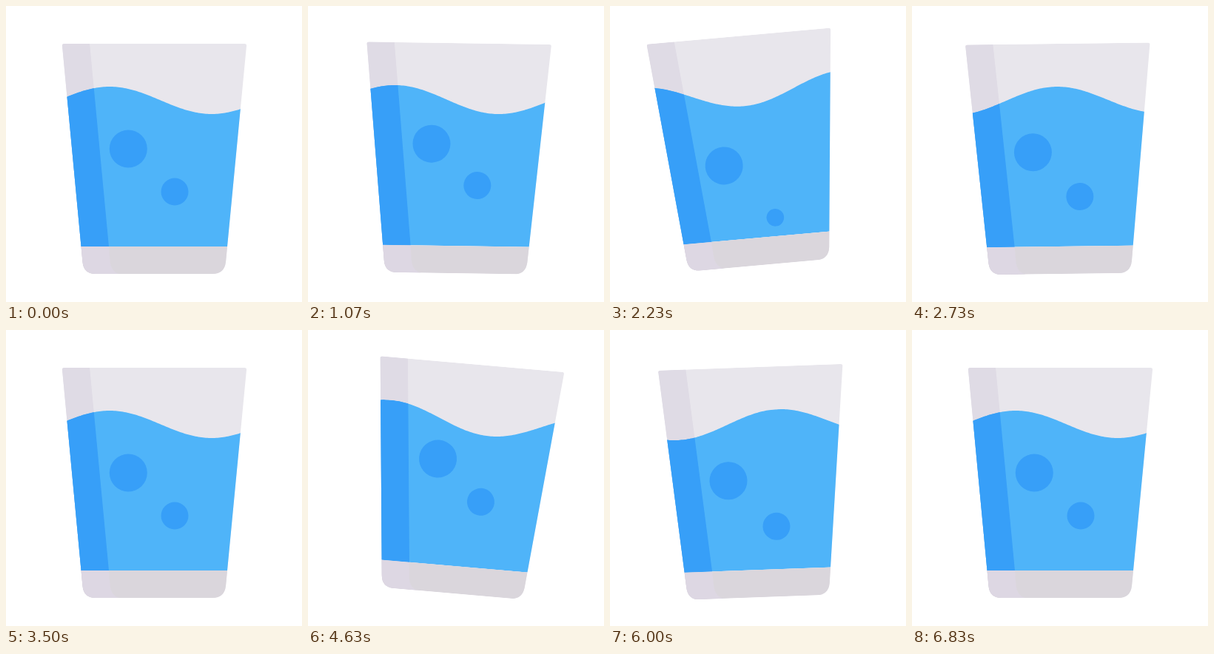
An HTML page that plays this animation: 400x400 px, repeating every 6860 ms.

```html
<!DOCTYPE html>
<html lang="en">
<head>
<meta charset="utf-8">
<title>Glass of water</title>
<style>
  html, body { margin: 0; width: 100%; height: 100%; overflow: hidden; background: #fff; }
  svg { display: block; width: 100%; height: 100%; }
</style>
</head>
<body>
<svg viewBox="0 0 400 400">
  <defs>
    <clipPath id="glassClip">
      <path d="M79 51H322Q325.5 51 325 54L297 346Q295 362 279 362H121Q105 362 103.500 346L76 54Q75.500 51 79 51Z"/>
    </clipPath>
    <clipPath id="waterClip"><path id="surface"/></clipPath>
    <path id="shade" d="M70 50H113L139 325L140.500 345Q142 361 157 363H70Z"/>
  </defs>
  <g id="glass" clip-path="url(#glassClip)">
    <rect x="70" y="45" width="260" height="325" fill="#e8e6ec"/>
    <use href="#shade" fill="#dfdbe5"/>
    <rect x="70" y="325" width="260" height="45" fill="#dad6dc"/>
    <svg x="0" y="325" width="400" height="45" viewBox="0 325 400 45">
      <use href="#shade" fill="#ddd7e3"/>
    </svg>
    <g clip-path="url(#waterClip)">
      <rect x="70" y="90" width="260" height="235" fill="#4fb4f9"/>
      <use href="#shade" fill="#379ff8"/>
      <g id="bubbles" fill="#379ff8"></g>
    </g>
  </g>
</svg>
<script>
const LOOP_MS = 3430;
const LOOP_BEATS = 103;
const FLOOR = 325;
const WAVE = { length: 276, height: 18.5, level: 127.5, crest: 140 };

const TILT = [[30, 0], [39.5, 7], [62, -5.6], [88, 0]];
const LIFT = [[30, 0], [50, -28], [80.5, 0]];
const DRIFT = [[22, 0], [98, -2 * WAVE.length]];

// Each bubble leaves its resting place, pops, and is reborn at the bottom.
const BUBBLES = [
  { x: 165.3, y: 193, r: 25.5, rise: 0.0535, pop: [40, 50], born: 41, grown: 63 },
  { x: 228, y: 251, r: 18.5, rise: 0.0786, pop: [50, 58], born: 61, grown: 76 }
];
const LEAVE = 22;
const SETTLE = 91;
const BIRTH_Y = 327;

const byId = id => document.getElementById(id);
const glass = byId("glass");
const surface = byId("surface");
const clamp = v => Math.min(1, Math.max(0, v));
const progress = (beat, from, to) => clamp((beat - from) / (to - from));
const easeInOut = u => (1 - Math.cos(Math.PI * u)) / 2;
const easeOut = u => 1 - (1 - u) ** 2;

const circles = BUBBLES.map(bubble => {
  const circle = document.createElementNS("http://www.w3.org/2000/svg", "circle");
  circle.setAttribute("cx", bubble.x);
  byId("bubbles").append(circle);
  return circle;
});

function track(keys, beat) {
  let value = keys[0][1];
  for (let i = 1; i < keys.length; i++) {
    const [from, start] = keys[i - 1];
    const [to, end] = keys[i];
    if (beat >= from) value = start + (end - start) * easeInOut(progress(beat, from, to));
  }
  return value;
}

function bubbleState({ y, r, rise, pop, born, grown }, beat) {
  if (beat < pop[1]) {
    const leaving = {
      y: y - rise * Math.max(0, beat - LEAVE) ** 2,
      r: r * (1 - progress(beat, ...pop) ** 2)
    };
    if (beat < born) return leaving;
  }
  return {
    y: BIRTH_Y + (y - BIRTH_Y) * easeOut(progress(beat, born, SETTLE)),
    r: r * easeOut(progress(beat, born, grown))
  };
}

function leavingState({ y, r, rise, pop }, beat) {
  return {
    y: y - rise * Math.max(0, beat - LEAVE) ** 2,
    r: r * (1 - progress(beat, ...pop) ** 2)
  };
}

// The first bubble is reborn before its old self has popped.
const ghost = circles[0].cloneNode();
byId("bubbles").append(ghost);

function place(circle, state) {
  circle.setAttribute("cy", state.y);
  circle.setAttribute("r", state.r);
}

function wavePath(drift) {
  let path = "M70 " + FLOOR;
  for (let x = 70; x <= 330; x += 2) {
    const angle = 2 * Math.PI * (x - WAVE.crest - drift) / WAVE.length;
    path += `L${x} ${(WAVE.level - WAVE.height * Math.cos(angle)).toFixed(2)}`;
  }
  return path + `L330 ${FLOOR}Z`;
}

function draw(ms) {
  const beat = (ms % LOOP_MS) / LOOP_MS * LOOP_BEATS;
  const tilt = track(TILT, beat);
  const shift = -0.45 * Math.abs(tilt);
  glass.setAttribute("transform",
    `translate(${shift} ${track(LIFT, beat)}) rotate(${tilt} 200.5 ${FLOOR})`);
  surface.setAttribute("d", wavePath(track(DRIFT, beat)));
  BUBBLES.forEach((bubble, i) => place(circles[i], bubbleState(bubble, beat)));
  const first = BUBBLES[0];
  place(ghost, beat >= first.born ? leavingState(first, beat) : { y: 0, r: 0 });
}

const begin = performance.now();
function tick() {
  draw(performance.now() - begin);
  requestAnimationFrame(tick);
}
tick();
</script>
</body>
</html>
```
